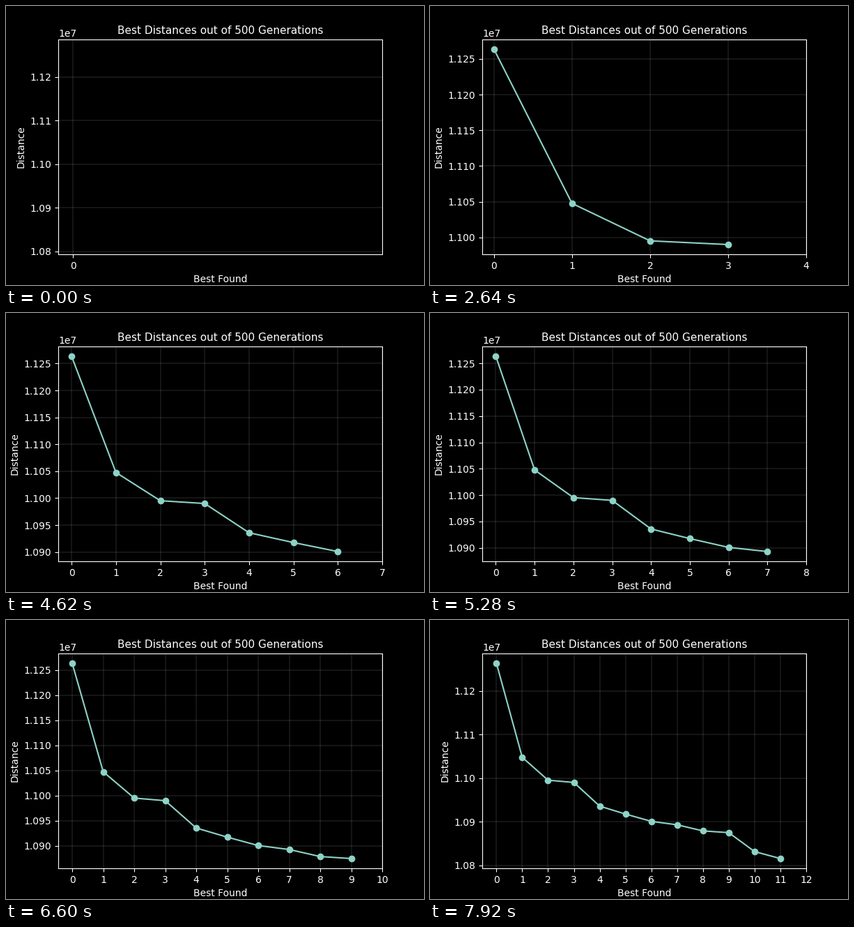
Recreate the animation shown at these times as a matplotlib script. Size 600 px wide and 400 px high, loop 8 s.

```python
import matplotlib.pyplot as plt
from matplotlib.animation import FuncAnimation

STEP_MS = 660
LOOP_MS = 8000
TICK_MS = 40

# Best distance found so far, in units of 1e7
BEST = [1.12635, 1.10477, 1.09953, 1.09901, 1.09358, 1.09176,
        1.09009, 1.0893, 1.0879, 1.0875, 1.08316, 1.08156]
DISTANCES = [value * 1e7 for value in BEST]

plt.style.use("dark_background")
plt.rcParams["font.family"] = "DejaVu Sans"
fig = plt.figure(figsize=(6, 4), dpi=100)


def make_panel(count):
    """Build the chart showing the first `count` distances."""
    ax = fig.add_subplot()
    # The empty chart keeps the limits of the whole series.
    shown = DISTANCES[:count] or DISTANCES
    ax.plot(range(len(shown)), shown, "o-", visible=count > 0)
    ax.set_xticks(range(count + 1))
    ax.grid(linewidth=0.25, alpha=0.5)
    ax.set_title("Best Distances out of 500 Generations", fontsize=11)
    ax.set_xlabel("Best Found")
    ax.set_ylabel("Distance")
    ax.set_visible(False)
    return ax


panels = [make_panel(count) for count in range(len(DISTANCES) + 1)]


def update(frame):
    current = int((frame + 0.5) * TICK_MS // STEP_MS)
    for count, ax in enumerate(panels):
        ax.set_visible(count == current)
    return panels


anim = FuncAnimation(fig, update, frames=LOOP_MS // TICK_MS,
                     interval=TICK_MS, repeat=True, repeat_delay=0, blit=False)
plt.show()
```
